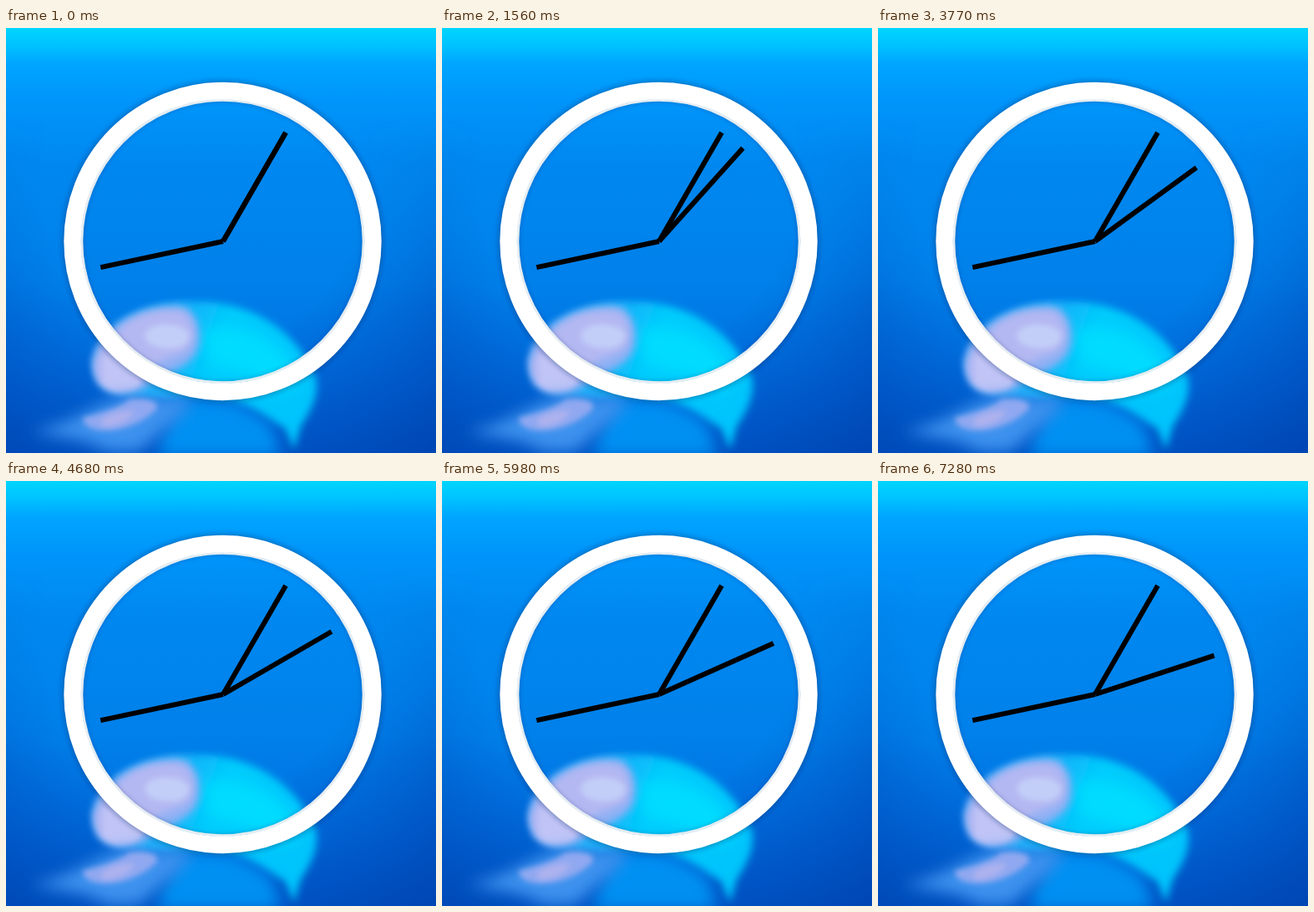
An HTML page for the animation above (7800 ms loop, 515x508 px).

```html
<!DOCTYPE html>
<html lang="en">
<head>
<meta charset="utf-8">
<title>Clock</title>
<style>
  html, body { margin: 0; width: 100%; height: 100%; overflow: hidden; background: #0080ea; }
  svg { display: block; width: 515px; height: 508px; }
  .hand { stroke: #000; stroke-width: 6; }
</style>
</head>
<body>
<svg viewBox="0 0 515 508">
  <defs>
    <linearGradient id="water" x2="0" y2="1">
      <stop offset="0" stop-color="#00d5ff"/>
      <stop offset=".04" stop-color="#00c3ff"/>
      <stop offset=".085" stop-color="#00a5ff"/>
      <stop offset=".17" stop-color="#0095fa"/>
      <stop offset=".32" stop-color="#0088f0"/>
      <stop offset=".6" stop-color="#0080ea"/>
      <stop offset=".8" stop-color="#0070e0"/>
      <stop offset="1" stop-color="#0060d2"/>
    </linearGradient>
    <radialGradient id="shade" gradientUnits="userSpaceOnUse" cx="235" cy="190" r="430">
      <stop offset=".45" stop-color="#0040b0" stop-opacity="0"/>
      <stop offset="1" stop-color="#003ca8" stop-opacity=".75"/>
    </radialGradient>
    <linearGradient id="fade" x2="0" y2="1">
      <stop offset=".2" stop-color="#000"/>
      <stop offset=".65" stop-color="#fff"/>
    </linearGradient>
    <mask id="low"><rect width="515" height="508" fill="url(#fade)"/></mask>
    <linearGradient id="dome" x1="0" x2="1" y2=".25">
      <stop offset="0" stop-color="#4aa0f4"/>
      <stop offset=".42" stop-color="#12b4fa"/>
      <stop offset=".6" stop-color="#00ccfc"/>
      <stop offset="1" stop-color="#00c4fc"/>
    </linearGradient>
    <filter id="b3" x="-30%" y="-30%" width="160%" height="160%"><feGaussianBlur stdDeviation="3"/></filter>
    <filter id="b5" x="-30%" y="-30%" width="160%" height="160%"><feGaussianBlur stdDeviation="5"/></filter>
    <filter id="b9" x="-40%" y="-40%" width="180%" height="180%"><feGaussianBlur stdDeviation="9"/></filter>
  </defs>

  <rect width="515" height="508" fill="url(#water)"/>
  <rect width="515" height="508" fill="url(#shade)" mask="url(#low)"/>

  <!-- jellyfish -->
  <path filter="url(#b5)" fill="url(#dome)" d="M105 400C108 362 150 327 222 327C300 325 352 368 371 418C376 440 362 462 353 476L345 504L334 478C310 466 290 445 250 444C215 440 180 448 150 440C120 436 104 422 105 400Z"/>
  <path filter="url(#b9)" fill="#0090f2" d="M205 448C250 436 290 450 318 476L330 512H180Z"/>
  <path filter="url(#b9)" fill="#00dcff" d="M238 360C280 350 330 372 350 412C352 432 335 440 315 425C290 410 262 410 240 398Z"/>
  <path filter="url(#b5)" fill="#8eb0f4" d="M104 402C108 364 152 334 205 332C232 334 236 368 228 388C214 410 190 412 172 426C150 446 122 440 110 424Z"/>
  <path filter="url(#b5)" fill="#b4b8f2" d="M134 362C154 340 190 334 212 340C228 352 228 380 212 388C186 398 170 404 160 418C146 438 116 434 108 414C104 396 116 382 134 362Z"/>
  <path filter="url(#b3)" fill="#c2cef8" d="M168 362C180 350 208 352 219 364C222 378 208 384 192 383C174 382 162 374 168 362Z"/>
  <path filter="url(#b3)" fill="#c0c4f6" d="M116 392C134 384 162 404 164 420C156 438 128 438 116 424Z"/>
  <path filter="url(#b9)" fill="#3c92ee" d="M30 482C80 474 100 452 140 440L222 442C218 466 184 480 160 506H120C100 490 66 490 30 482Z"/>
  <path filter="url(#b3)" fill="#90a8f0" d="M92 466C112 460 132 456 148 444C162 442 186 444 180 456C166 470 142 482 116 481C100 480 92 474 92 466Z"/>
  <path filter="url(#b3)" fill="#aeb2ee" d="M114 468C126 460 144 456 154 458C148 470 130 477 116 476Z"/>

  <!-- rim -->
  <circle cx="259.5" cy="255" r="180" fill="none" stroke="#002a60" stroke-opacity=".42" stroke-width="23" filter="url(#b3)"/>
  <circle cx="259.5" cy="255" r="168.7" fill="none" stroke="#e4ecf2" stroke-width="3"/>
  <circle cx="259.5" cy="255" r="180" fill="none" stroke="#fff" stroke-width="20.4"/>

  <g transform="translate(260 255)">
    <path class="hand" d="M0 0V-150" transform="rotate(258)"/>
    <path class="hand" d="M0 0V-150" transform="rotate(30)"/>
    <path class="hand" id="second" d="M0 0V-150" transform="rotate(30)"/>
  </g>
</svg>
<script>
  const LOOP = 7800, STEP = 6, START = 30;
  const ticks = [390, 1560, 2600, 3510, 4680, 5720, 6760];
  const second = document.getElementById("second");

  function draw(now) {
    const t = now % LOOP;
    const count = ticks.filter(at => t >= at).length;
    second.setAttribute("transform", `rotate(${START + count * STEP})`);
    requestAnimationFrame(draw);
  }
  draw(performance.now());
</script>
</body>
</html>
```
